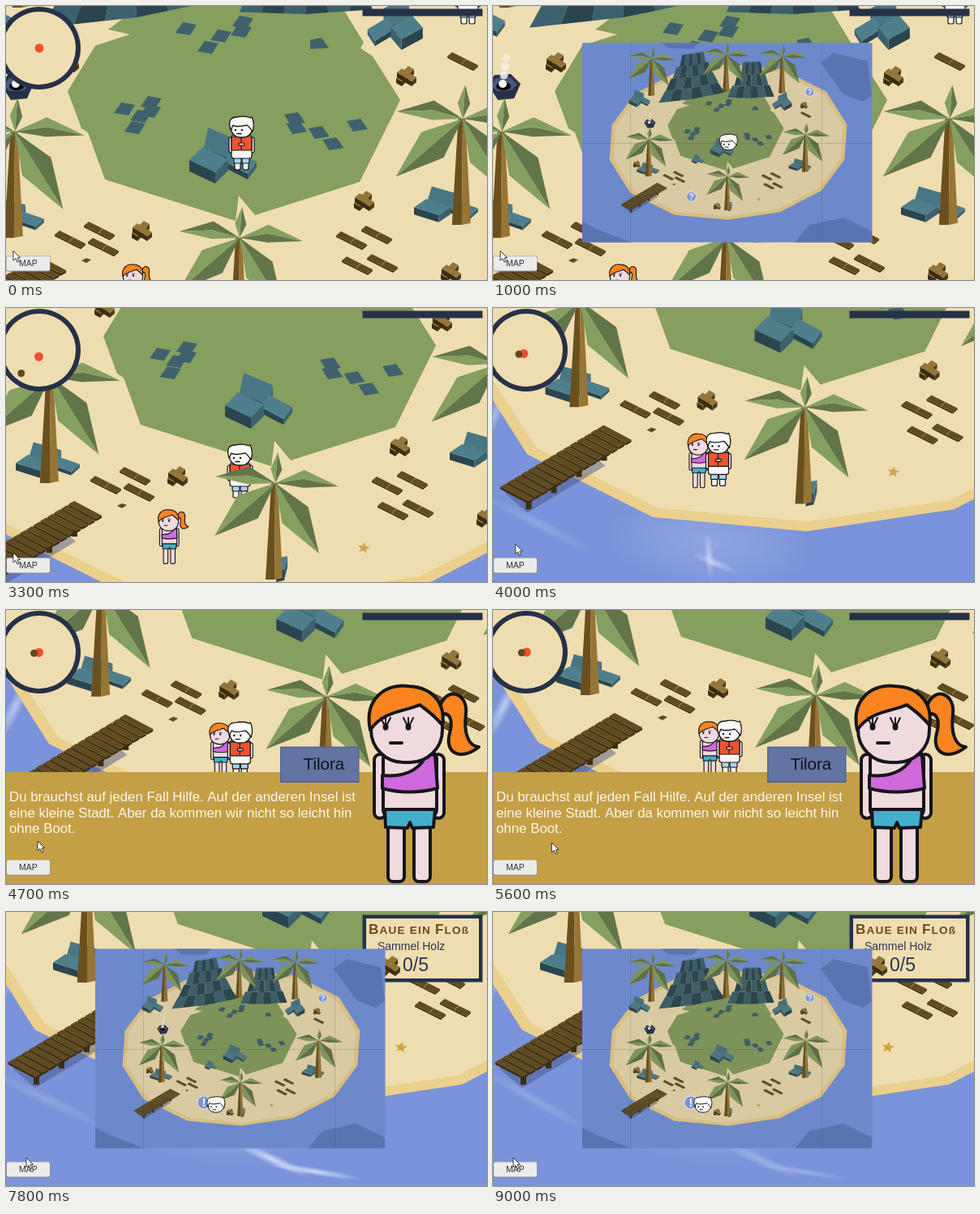
Animation of 593x338 px, one loop 9100 ms. Source, as an HTML page with a canvas:

```html
<!DOCTYPE html>
<html lang="de">
<head>
<meta charset="utf-8">
<title>Insel</title>
<style>
html, body { margin: 0; width: 100%; height: 100%; overflow: hidden; background: #7b93da; }
canvas { display: block; width: 593px; height: 338px; }
</style>
</head>
<body>
<canvas id="stage"></canvas>
<script>
const W = 593, H = 338, LOOP = 9100, ZOOM = 0.35;
const canvas = document.getElementById('stage');
const g = canvas.getContext('2d');
const dpr = window.devicePixelRatio || 1;
canvas.width = W * dpr;
canvas.height = H * dpr;

const FONT = '"Liberation Sans", Arial, sans-serif';
const NAVY = '#263148', SAND = '#eeddb0', GRASS = '#869e5e', INK = '#16161a';
// top, right side, front
const ROCK = ['#4f7f8d', '#3c616e', '#2a454f'];
const BEAM = ['#94753a', '#4d3a17', '#3b2d12'];
const PLANK = ['#614b20', '#3b2d12', '#3b2d12'];
const LEAF = ['#859f61', '#62754a'];
const GIRL = [157, 352];

// time, x, y
const walk = [[0, 290, 168], [2400, 290, 168], [2900, 244, 222], [3400, 244, 282], [4000, 181, 349],
  [6700, 181, 349], [7100, 200, 367]];
const camera = [[2450, 0, 0], [3300, 44, -70], [4100, 104, -177], [5200, 110, -181], [6700, 110, -181], [7200, 90, -199]];
const pointer = [[3500, 9, 302], [4300, 39, 285], [4800, 39, 285], [6000, 89, 288], [6700, 89, 288], [7200, 25, 303]];

function track(keys, t) {
  let i = keys.length - 1;
  while (i > 0 && keys[i][0] > t) i--;
  const a = keys[i], b = keys[i + 1] || a;
  const k = b === a ? 0 : Math.max(0, (t - a[0]) / (b[0] - a[0]));
  return [a[1] + (b[1] - a[1]) * k, a[2] + (b[2] - a[2]) * k];
}

function trace(p) {
  g.beginPath();
  for (let i = 0; i < p.length; i += 2) g.lineTo(p[i], p[i + 1]);
}
function poly(color, ...p) {
  trace(p);
  g.closePath();
  g.fillStyle = color;
  g.fill();
}
function line(...p) {
  trace(p);
  g.stroke();
}
function disc(x, y, r, color, ry = r) {
  g.beginPath();
  g.ellipse(x, y, r, ry, 0, 0, 7);
  g.fillStyle = color;
  g.fill();
}
function box(x, y, w, h, r, color) {
  g.beginPath();
  g.roundRect(x, y, w, h, r);
  g.fillStyle = color;
  g.fill();
}
function outlined(...args) {
  box(...args);
  g.stroke();
}
function inked(color, draw) {
  g.beginPath();
  draw();
  g.closePath();
  g.fillStyle = color;
  g.fill();
  g.stroke();
}
function at(x, y, s, draw, sy = s) {
  g.save();
  g.translate(x, y);
  g.scale(s, sy);
  draw();
  g.restore();
}
function label(s, x, y, size, color, weight = '', align = 'left') {
  g.font = `${weight} ${size}px ${FONT}`;
  g.fillStyle = color;
  g.textAlign = align;
  g.fillText(s, x, y);
}

// slab with top edges a and b from its back corner, and height h
function block(x, y, ax, ay, bx, by, h, [top, side, front]) {
  const fx = x + ax + bx, fy = y + ay + by;
  poly(front, x + bx, y + by, fx, fy, fx, fy + h, x + bx, y + by + h);
  poly(side, x + ax, y + ay, fx, fy, fx, fy + h, x + ax, y + ay + h);
  poly(top, x, y, x + ax, y + ay, fx, fy, x + bx, y + by);
}

function rocks(x, y, s, sy) {
  at(x, y, s, () => {
    block(-17, -35, 36, 15, -5, 25, 12, ['#497684', ROCK[1], ROCK[2]]);
    block(14, -8, 29, 15, -11, 15, 7, ROCK);
    block(-24, -11, 32, 15, -16, 16, 14, ROCK);
  }, sy);
}
function plank(x, y) {
  block(x - 13, y - 11, 32, 16, -6, 5, 2, PLANK);
  g.strokeStyle = '#b49a5a';
  g.lineWidth = 0.8;
  line(x - 1, y + 4, x + 1, y, x + 5, y - 2);
}
function cross(x, y) {
  block(x + 3, y - 12, 7, 4, -15, 15, 6, BEAM);
  block(x - 5, y - 9, 18, 11, -6, 5, 6, BEAM);
}

// two tones either side of a rib; the lit half comes first
function leaf(tx, ty, width, lift = 0) {
  const k = width / Math.hypot(tx, ty), mx = tx * 0.45, my = ty * 0.45 - lift;
  const nx = ty * k, ny = -tx * k;
  const left = nx < 0 || (Math.abs(nx) < width / 4 && ny < 0) ? 1 : -1;
  poly(LEAF[1], 0, 0, mx, my, tx, ty, mx - nx * left, my - ny * left);
  poly(LEAF[0], 0, 0, mx, my, tx, ty, mx + nx * left, my + ny * left);
}
function palm(x, y, s) {
  at(x, y, s, () => {
    poly('#6b501d', -5, 0, -12, 119, -1, 119, 0, 0);
    poly('#967535', 0, 0, -1, 119, 9, 117, 3, 0);
    leaf(-75, 65, 19);
    leaf(54, 87, 19);
    leaf(-74, -8, 11, 6);
    leaf(78, 4, 11, 7);
    leaf(3, -38, 7);
  });
}

function dock() {
  poly('rgba(62,78,130,.45)', -82, 392, -54, 416, 42, 358, 20, 340);
  for (let i = 0; i < 4; i++) box(-56 + i * 31, 402 - i * 20, 7, 10, 0, BEAM[2]);
  for (let i = 0; i < 15; i++) block(40 - i * 8.6, 308 + i * 5.15, 34, 18, -7, 4, 3, PLANK);
}

// stacked tiers of striped columns, each capped by a lit ledge
function crag(x, base, width, tiers, rise, slope) {
  const cols = 6;
  for (let i = 0; i < tiers; i++) {
    const low = width * (1 - i * 0.8 / tiers) / 2, high = low * 0.8, shift = i * 1.5;
    const edge = (half, k, y) => {
      const dx = (k / cols * 2 - 1) * half;
      return [x + shift + dx, y - dx * slope - Math.abs(dx) * 0.05];
    };
    const y = base - i * rise, top = y - rise;
    for (let k = 0; k < cols; k++) {
      poly(ROCK[(k + i) % 2 + 1], ...edge(low, k, y), ...edge(low, k + 1, y), ...edge(high, k + 1, top), ...edge(high, k, top));
    }
    poly(ROCK[0], ...edge(high, 0, top), ...edge(high, cols, top), ...edge(high * 0.7, cols, top - 3), ...edge(high * 0.8, 0, top - 3));
  }
}

function stones(x, y, sx) {
  for (const [dx, dy] of [[0, 0], [27, 23], [43, 9], [68, 3], [70, -8]]) {
    at(x + dx * sx, y + dy, Math.sign(sx), () => poly('#3f616c', -13, 5, -4, -8, 13, -5, 5, 8), 1);
  }
}

function pit(t) {
  at(14, 99, 1, () => {
    poly(NAVY, -20, -2, -12, -14, 8, -15, 20, -3, 12, 15, -8, 17);
    poly('#4a587c', -17, -1, -10, -10, 7, -11, 16, -2, 8, 5, -9, 6);
    disc(-1, 0, 9, '#05070c', 5);
    for (let i = 0; i < 4; i++) {
      const k = (t / 2000 + i / 4) % 1;
      g.globalAlpha = 1 - k * 0.6;
      disc(k * 6 - 2, -3 - k * 42, 5, '#f6f6f2');
    }
    g.globalAlpha = 1;
  });
}

function face() {
  g.lineJoin = g.lineCap = 'round';
  g.strokeStyle = INK;
  g.lineWidth = 1.3;
  outlined(-12.5, -30, 26, 24, 11, '#f7f7f5');
  inked('#fbfbf8', () => {
    g.moveTo(-13, -15);
    g.quadraticCurveTo(-18, -31, -5, -31);
    g.quadraticCurveTo(6, -33, 11, -30);
    g.lineTo(13, -31);
    g.quadraticCurveTo(17, -23, 14, -13);
    g.quadraticCurveTo(9, -20, 7, -21);
    g.quadraticCurveTo(-7, -18, -10, -21);
  });
  for (const x of [-7, 1]) disc(x, -15, 1.2, INK);
  line(-5, -10.5, 0, -10.5);
}
function man(x, y, step) {
  at(x, y, 1, () => {
    g.strokeStyle = INK;
    g.lineWidth = 1.2;
    for (const s of [-1, 1]) {
      const up = Math.max(0, s * step) * 4, lx = s * 5 - 3;
      outlined(lx, 18, 7, 16 - up, 2, '#f4f1ef');
      outlined(lx - 1, 17, 9, 9 - up / 2, 1, '#a9d4ee');
      outlined(s * 13 - 2, -6, 5, 19, 2.5, '#f4f1ef');
    }
    outlined(-12, -9, 25, 29, 3, '#f8f6f4');
    outlined(-12, -7, 25, 17, 2, '#ef5330');
    line(0, -6, 0, 9);
    outlined(-3, 1, 7, 3, 1, '#f3c9a5');
    face();
  });
}

function girl(x, y, s) {
  const skin = '#efdade', hair = '#f98420';
  at(x, y, s, () => {
    g.lineJoin = g.lineCap = 'round';
    g.strokeStyle = INK;
    g.lineWidth = 4;
    inked(hair, () => {
      g.moveTo(38, -92);
      g.bezierCurveTo(46, -122, 74, -112, 71, -86);
      g.bezierCurveTo(68, -62, 74, -46, 87, -45);
      g.bezierCurveTo(66, -28, 44, -36, 51, -62);
      g.bezierCurveTo(56, -80, 50, -90, 38, -84);
    });
    for (const side of [-1, 1]) {
      outlined(side * 16 - 9, 46, 20, 75, 6, skin);
      outlined(side * 36 - 6, -36, 14, 79, 7, skin);
    }
    outlined(-31, -40, 66, 82, 10, skin);
    inked('#d069dc', () => {
      g.moveTo(-32, -10);
      g.quadraticCurveTo(10, -6, 24, -38);
      g.lineTo(33, -34);
      g.lineTo(36, 6);
      g.quadraticCurveTo(0, 15, -32, 6);
    });
    inked('#43b0cb', () => {
      g.moveTo(-29, 32);
      g.lineTo(33, 32);
      g.lineTo(31, 54);
      g.lineTo(5, 55);
      g.lineTo(2, 48);
      g.lineTo(-1, 55);
      g.lineTo(-28, 54);
    });
    outlined(-46, -112, 88, 86, 40, skin);
    inked(hair, () => {
      g.moveTo(-47, -66);
      g.bezierCurveTo(-55, -104, -28, -124, 0, -120);
      g.bezierCurveTo(32, -119, 46, -96, 42, -72);
      g.bezierCurveTo(32, -84, 24, -90, 14, -97);
      g.bezierCurveTo(-6, -88, -30, -90, -47, -66);
    });
    g.lineWidth = 2;
    for (const ex of [-28, 0]) {
      disc(ex, -70, 3.5, INK, 4.5);
      for (const d of [-5, 0, 5]) line(ex + d * 0.5, -74, ex + d * 1.2, -81);
    }
    g.lineWidth = 4;
    line(-22, -50, -8, -50);
  });
}

function shore(color, rx, ry) {
  const p = [], sides = 14;
  for (let i = 0; i < sides; i++) {
    const a = Math.PI / 2 + i * 2 * Math.PI / sides, c = Math.cos(a), s = Math.sin(a);
    const r = 1 + 0.1 * Math.max(0, -c * s);
    p.push(290 + c * r * rx, 165 + s * r * ry);
  }
  poly(color, ...p);
}
function star(x, y) {
  const p = [];
  for (let i = 0; i < 10; i++) {
    const r = i % 2 ? 3.5 : 8, a = i * Math.PI / 5 - 1.4;
    p.push(x + r * Math.cos(a), y + r * 0.9 * Math.sin(a));
  }
  poly('#d2a24a', ...p);
}

function ground(t, crosses) {
  shore('#ebcf8c', 420, 274);
  shore(SAND, 406, 262);
  poly(GRASS, 76, 105, 110, 49, 153, 35, 126, 29, 165, 0, 200, -22, 400, -22, 441, 45, 437, 52, 452, 62, 486, 116,
    436, 217, 307, 258, 287, 234, 283, 265, 122, 214, 101, 156, 93, 151);
  stones(222, 28, 1);
  stones(433, 147, -1.1);
  stones(146, 127, 0.47);
  at(385, 47, -1, () => poly('#3f616c', -13, 5, -4, -8, 10, -5, 10, 6), 1);
  crag(161, 14, 232, 4, 40, 0.16);
  crag(370, 10, 164, 3, 42, 0.02);
  for (const [x, y] of [[79, 288], [115, 277], [120, 297], [426, 289], [457, 282], [433, 320], [464, 317], [563, 68]]) plank(x, y);
  poly(PLANK[0], 93, 314, 99, 311, 105, 313, 99, 317);
  dock();
  for (const [x, y] of crosses) cross(x, y);
  rocks(-24, 12, 0.9);
  rocks(481, 22, -0.82, 0.95);
  rocks(6, 258, 0.95, 0.64);
  rocks(541, 245, 0.95, 0.64);
  rocks(266, 185, 1);
  star(397, 366);
  pit(t);
  for (const [x, y] of [[21, -129], [284, -143], [481, -138], [11, 155], [563, 139]]) palm(x, y, 1.1);
}
function frontPalm() {
  block(293, 378, 10, -2, -4, 16, 14, ROCK);
  palm(288, 286, 1);
}

function glow(x, y, rx, ry, turn, alpha) {
  g.save();
  g.translate(x, y);
  g.rotate(turn);
  g.scale(rx, ry);
  const f = g.createRadialGradient(0, 0, 0, 0, 0, 1);
  f.addColorStop(0, `rgba(232,240,255,${alpha})`);
  f.addColorStop(1, 'rgba(232,240,255,0)');
  disc(0, 0, 1, f);
  g.restore();
}
function sea(t) {
  const w = Math.sin(t / 700);
  glow(170, 452, 130, 60, 0.1, 0.2);
  glow(-97, 300, 50, 9, -1.1, 0.5 + w * 0.1);
  glow(-40, 430, 80, 8, 0.5 + w * 0.05, 0.2);
  if (t < 7000) {
    glow(170, 470, 6, 30, 0.15 * w, 0.5);
    glow(177, 478, 30, 6, 0.4, 0.5);
  } else {
    const fade = 0.85 - (t - 7600) / 2600;
    glow(238, 504, 55, 7, 0.42, fade);
    glow(290, 519, 60, 5, 0.16, fade);
  }
}

function radar(cx, cy, px, py) {
  const dot = (x, y, r, c) => disc(41 + (x + cx - 290) / 4, 52 + (y + cy - 168) / 4, r, c);
  disc(41, 52, 51, NAVY);
  g.save();
  disc(41, 52, 45, SAND);
  g.clip();
  dot(px, py, 5.5, '#f0502c');
  dot(...GIRL, 4.5, '#5f4a20');
  g.restore();
}

function quest(t) {
  const open = Math.min(1, Math.max(0, (t - 5800) / 400));
  const h = 9 + 74 * open;
  box(439.5, 3.5, 148, h, 0, NAVY);
  if (!open) return;
  g.save();
  box(444, 8, 139, Math.max(0, h - 9), 0, SAND);
  g.clip();
  let x = 447;
  g.letterSpacing = '1.2px';
  for (const [s, size] of [['B', 17], ['AUE EIN ', 13.6], ['F', 17], ['LOß', 13.6]]) {
    label(s, x, 27, size, '#6b4b1c', 'bold');
    x += g.measureText(s).width;
  }
  g.letterSpacing = '0px';
  label('Sammel Holz', 458, 47, 14, '#2b3550');
  cross(473, 66);
  label('0/5', 489, 73, 23, '#2b3550');
  g.restore();
}

function marker(x, y, r, sign) {
  disc(x, y, r, '#dbe2f2');
  disc(x, y, r - 1, '#7d94cf');
  label(sign, x, y + r * 0.6, r * 1.7, '#f4f6fb', 'bold', 'center');
}
function mapPanel(t, px, py) {
  g.save();
  box(110, 45.5, 357.5, 246, 0, '#7393e0');
  g.clip();
  const isle = '#5e7bc2';
  poly(isle, 404, 70, 420, 58, 462, 68, 467, 110, 456, 118, 432, 109);
  poly(isle, 110, 266, 130, 276, 172, 292, 110, 292);
  poly(isle, 372, 292, 390, 270, 432, 261, 467, 278, 467, 292);
  poly(isle, 207, 45, 254, 45, 246, 53, 216, 52);
  g.save();
  g.translate(290, 169);
  g.scale(ZOOM, ZOOM);
  g.translate(-290, -168);
  ground(t, [[556, 34], [-33, 242], [250, 390]]);
  rocks(181, 225, 0.5);
  frontPalm();
  g.restore();
  g.fillStyle = 'rgba(70,70,50,.12)';
  g.fillRect(110, 45, 358, 247);
  g.strokeStyle = 'rgba(60,75,80,.28)';
  g.lineWidth = 0.7;
  line(110, 169.5, 468, 169.5);
  for (const x of [169.5, 405.5]) line(x, 45, x, 292);
  marker(390.5, 106, 6, '?');
  if (t < 5000) marker(244.5, 235, 6.5, '?');
  else marker(244, 235, 8.5, '!');
  at(290 + (px - 290) * ZOOM, 182 + (py - 168) * ZOOM, 0.75, face);
  g.restore();
}

function dialog() {
  g.fillStyle = '#c49f46';
  g.fillRect(0, 200, W, H - 200);
  box(338, 168.5, 97.5, 44.5, 1, '#56658f');
  box(339.5, 170, 94.5, 41.5, 1, '#6374a3');
  label('Tilora', 392, 197, 20.5, '#10131c', '', 'center');
  ['Du brauchst auf jeden Fall Hilfe. Auf der anderen Insel ist',
   'eine kleine Stadt. Aber da kommen wir nicht so leicht hin',
   'ohne Boot.'].forEach((s, i) => label(s, 4, 236 + i * 19.7, 16.85, '#fbf7ea'));
  girl(496, 214, 1);
}

function button() {
  box(0.5, 308, 54, 19.5, 2, '#8f8f8f');
  box(1, 308.5, 53, 18, 2, '#ebebeb');
  label('MAP', 27.5, 321.3, 10.5, '#323232', '', 'center');
}
function arrow(x, y) {
  at(x, y, 1, () => {
    poly('#fff', 0, 0, 0, 12, 3, 9.5, 5, 14, 7, 13, 5, 8.8, 8.5, 8.5);
    g.strokeStyle = '#222';
    g.lineWidth = 0.9;
    g.stroke();
  });
}

function draw(t) {
  const [cx, cy] = track(camera, t), [px, py] = track(walk, t);
  const [nx, ny] = track(walk, t + 20);
  const step = nx !== px || ny !== py ? Math.sin(t / 75) : 0;
  const mapOpen = (t >= 700 && t < 2400) || t >= 7200;

  g.setTransform(dpr, 0, 0, dpr, 0, 0);
  g.fillStyle = '#7b93da';
  g.fillRect(0, 0, W, H);
  g.save();
  g.translate(cx, cy);
  sea(t);
  ground(t, [[493, 86], [441, 240], [167, 277], [548, 328], [77, 69]]);
  man(569, -12, 0);
  girl(...GIRL, 0.276);
  man(px, py, step);
  frontPalm();
  g.restore();

  if (t >= 4100 && t < 5700) dialog();
  quest(t);
  if (mapOpen) mapPanel(t, px, py);
  else radar(cx, cy, px, py);
  button();
  arrow(...track(pointer, t));
}

// the picture advances ten times a second
function tick(now) {
  draw(Math.floor((now % LOOP) / 100) * 100);
  requestAnimationFrame(tick);
}
draw(0);
requestAnimationFrame(tick);
</script>
</body>
</html>
```
